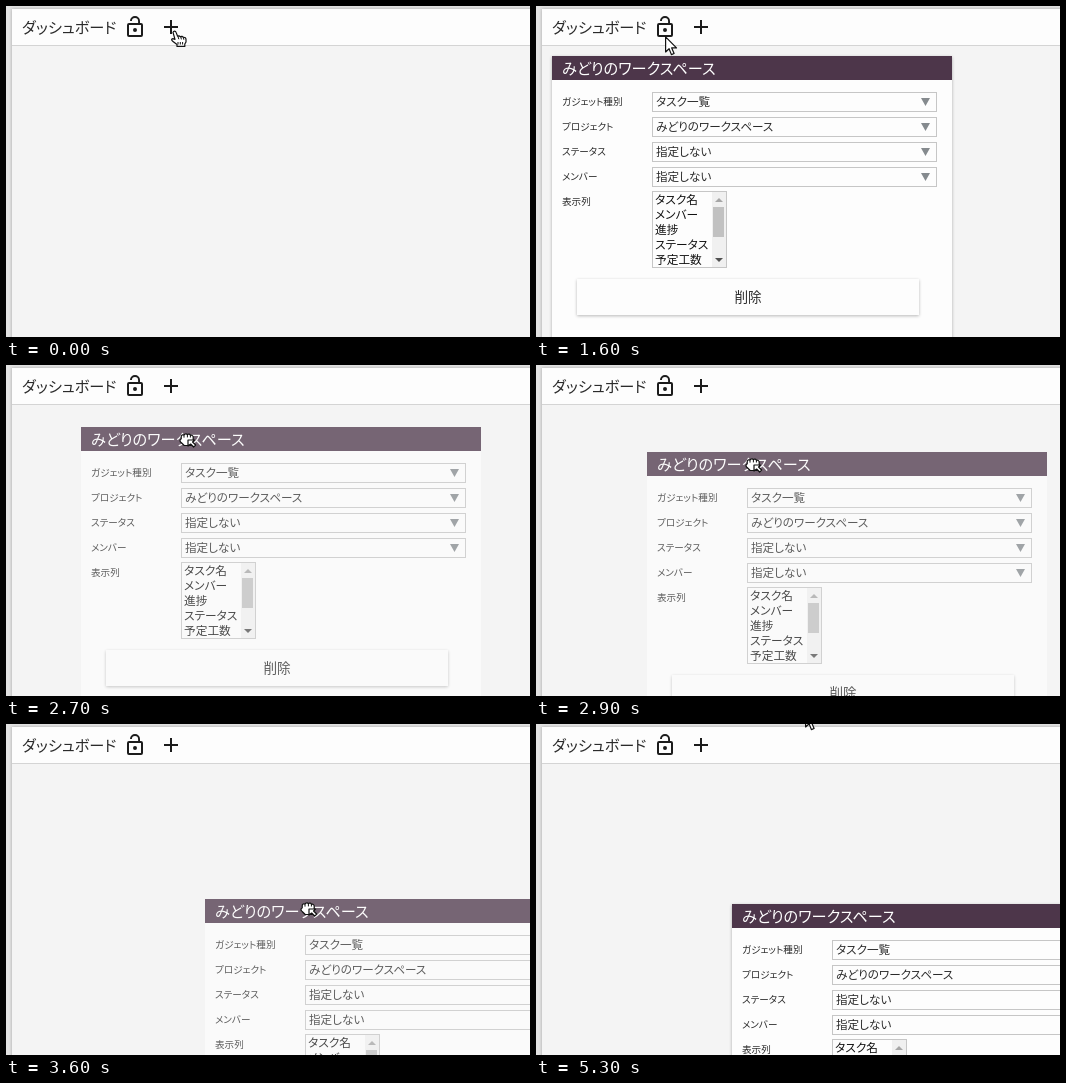
An HTML page for the animation above (5.6 s loop, 524 px wide and 331 px high).

```html
<!DOCTYPE html>
<html lang="ja">
<head>
<meta charset="utf-8">
<title>ダッシュボード</title>
<style>
html, body { margin: 0; width: 100%; height: 100%; overflow: hidden; background: #e2e2e2; }
body { font-family: "Noto Sans CJK JP", "Noto Sans CJK", sans-serif; font-feature-settings: "palt"; color: #2b2b2b; }
div, span, svg { position: absolute; box-sizing: border-box; white-space: nowrap; }
svg { overflow: visible; }
#stage { left: 0; top: 0; width: 524px; height: 331px; overflow: hidden; background: #e2e2e2; }
#page { left: 6px; top: 3px; width: 530px; height: 340px; background: #f4f4f4; box-shadow: 0 0 3px rgba(0,0,0,.25); }
#bar { left: 0; top: 0; width: 530px; height: 37px; background: #fdfdfd; border-bottom: 1px solid #d4d4d4; }
#bar span { left: 10px; top: 5px; font-size: 15.2px; line-height: 24px; }
#panel { left: 0; top: 0; width: 400px; height: 420px; background: #fdfdfd; box-shadow: 0 1px 3px rgba(0,0,0,.3); }
#panel.held { opacity: .75; box-shadow: none; }
#title { left: 0; top: 0; width: 400px; height: 24px; padding-left: 10px; background: #4d364a; color: #fff; font-size: 15.2px; line-height: 22px; }
.label { left: 10px; font-size: 9.6px; line-height: 20px; }
.select { left: 100px; width: 285px; height: 20px; border: 1px solid #c6c6c6; padding-left: 3px; font-size: 11.6px; line-height: 17px; }
.select svg { left: 268px; top: 5px; }
#list { left: 100px; top: 135px; width: 75px; height: 77px; border: 1px solid #c6c6c6; overflow: hidden; font-size: 11.7px; line-height: 15px; color: #111; }
#list span { left: 2px; }
#scroll { left: 59px; top: 0; width: 14px; height: 75px; background: #f0f0f0; }
#thumb { left: 1px; top: 15px; width: 11px; height: 30px; background: #c1c1c1; }
#button { left: 25px; top: 223px; width: 342px; height: 36px; background: #fdfdfd; box-shadow: 0 1px 3px rgba(0,0,0,.28); text-align: center; font-size: 13.6px; line-height: 35px; }
.cursor { left: 0; top: 0; display: none; }
.cursor path { fill: #fff; stroke: #111; stroke-width: 1.2; stroke-linejoin: round; }
.cursor .line { fill: none; stroke-width: 1; }
</style>
</head>
<body>
<div id="stage">
  <div id="page">
    <div id="bar"><span>ダッシュボード</span></div>
  </div>
  <svg width="24" height="24" style="left:117px;top:9px" fill="#1c1c1c"><path d="M12 17a2 2 0 1 0 0-4 2 2 0 0 0 0 4zM18 8h-1V6A5 5 0 0 0 7 6h1.9a3.1 3.1 0 0 1 6.2 0v2H6a2 2 0 0 0-2 2v10a2 2 0 0 0 2 2h12a2 2 0 0 0 2-2V10a2 2 0 0 0-2-2zm0 12H6V10h12z"/></svg>
  <svg width="24" height="24" style="left:153px;top:9px" fill="#1c1c1c"><path d="M19 13h-6v6h-2v-6H5v-2h6V5h2v6h6z"/></svg>

  <div id="panel">
    <div id="title"></div>
    <div id="list">
      <div id="scroll">
        <div id="thumb"></div>
        <svg width="14" height="75"><path d="M3 10h8l-4-4z" fill="#a6a6a6"/><path d="M3 66h8l-4 4z" fill="#505050"/></svg>
      </div>
    </div>
    <div id="button">削除</div>
  </div>

  <svg class="cursor" id="hand" width="18" height="18">
    <path d="M3 2.4C3.6 .8 5.5.7 6.1 2.4L7.6 6.2 9 5.8 10.4 6.7 12 6.3 13.3 7.3C15 7 16 8 16 9.5V12L14.8 14V16.4H7V14.5L3 11.6C1 10.2 1.4 8.6 2.8 8.6L5 9.4z"/>
    <path class="line" d="M8 6.5l.8 2.7M10.8 7l.6 2.4M13.4 7.5l.4 2.2M8 12v2.5M10.3 12v2.5M12.6 12v2.5"/>
  </svg>
  <svg class="cursor" id="fist" width="18" height="16">
    <path d="M2.2 4.2C2 2 4 1.4 5 2.2 5.8.5 7.7.5 8.4 1.7 9.4.6 11 1 11.4 2.4 13 1.8 14.3 2.8 14.2 4.6V9L12.4 12.5H5.2L2.4 9.8C.6 8.5.5 6.5 2.2 6z"/>
    <path class="line" d="M5 2.4v2.2M8.4 2v2.4M11.4 2.5v2"/>
    <path d="M9 7h6.6l-2 2 3 3-2 2-3-3L9 13z"/>
  </svg>
  <svg class="cursor" id="arrow" width="13" height="20">
    <path d="M.6.8V16l3.5-3.3 2.3 5.9 2.7-1.1-2.4-5.6h4.8z"/>
  </svg>
</div>

<script>
const LOOP = 5600, STEP = 100;
const SHOW = 1100, GRAB = 2500, DROP = 3900, LEAVE = 4900;
const NAME = 'みどりのワークスペース';
const $ = id => document.getElementById(id);
const panel = $('panel');
const cursors = ['hand', 'fist', 'arrow'].map($);

function add(parent, tag, cls, top, text) {
  const el = document.createElement(tag);
  el.className = cls;
  el.style.top = top + 'px';
  el.textContent = text;
  parent.appendChild(el);
  return el;
}

$('title').textContent = NAME;
const fields = [
  ['ガジェット種別', 'タスク一覧'], ['プロジェクト', NAME],
  ['ステータス', '指定しない'], ['メンバー', '指定しない'], ['表示列']
];
fields.forEach(([label, value], i) => {
  add(panel, 'span', 'label', 35 + 25 * i, label);
  if (!value) return;
  add(panel, 'div', 'select', 36 + 25 * i, value)
    .insertAdjacentHTML('beforeend', '<svg width="9" height="9"><path d="M0 0h9l-4.5 8z" fill="#858a8e"/></svg>');
});
['タスク名', 'メンバー', '進捗', 'ステータス', '予定工数']
  .forEach((text, i) => add($('list'), 'span', '', -1 + 15 * i, text));

const progress = (t, from, to) => Math.min(1, Math.max(0, (t - from) / (to - from)));
const mix = (a, b, k) => a + (b - a) * k;
const easeIn = (k, power) => k ** power;
const easeOut = (k, power) => 1 - (1 - k) ** power;

// The sideways pull slows down; the downward pull starts later and stays steady.
function panelAt(t) {
  if (t >= DROP) return [196, 180];
  return [
    mix(16, 199, easeOut(progress(t, 2400, 3600), 1.36)),
    mix(50, 175, easeIn(progress(t, 2600, 3600), 1.015))
  ];
}

function cursorAt(t) {
  if (t < 1400) {
    const nudge = 2 * Math.min(2, Math.floor(t / 200));
    return [164 - nudge, mix(24 - nudge, 10, progress(t, 900, 1200))];
  }
  if (t < 2400) {
    const k = progress(t, 1300, 1900);
    return [mix(160, 112, easeOut(k, 1.5)), mix(10, 50, k)];
  }
  if (t < GRAB) return [120, 56];
  if (t < DROP) {
    const [x, y] = panelAt(t);
    return [Math.min(x + 98, 294), Math.min(y + 6, 178)];
  }
  const k = progress(t, 4800, 5300);
  return [mix(t < 4500 ? 288 : 290, 269, k), mix(176, -13, k)];
}

function cursorKind(t) {
  if (t < 1400) return 0;
  return t >= GRAB && t < LEAVE ? 1 : 2;
}

function place(el, [x, y]) {
  el.style.transform = `translate(${Math.round(x)}px,${Math.round(y)}px)`;
}

function draw(now) {
  const t = Math.floor(now % LOOP / STEP) * STEP;
  place(panel, panelAt(t));
  panel.style.display = t < SHOW ? 'none' : 'block';
  panel.className = t >= GRAB && t < DROP ? 'held' : '';

  const kind = cursorKind(t);
  cursors.forEach((el, i) => { el.style.display = i === kind ? 'block' : 'none'; });
  place(cursors[kind], cursorAt(t));
}

const start = performance.now();
function tick() {
  draw(performance.now() - start);
  requestAnimationFrame(tick);
}
tick();
</script>
</body>
</html>
```
